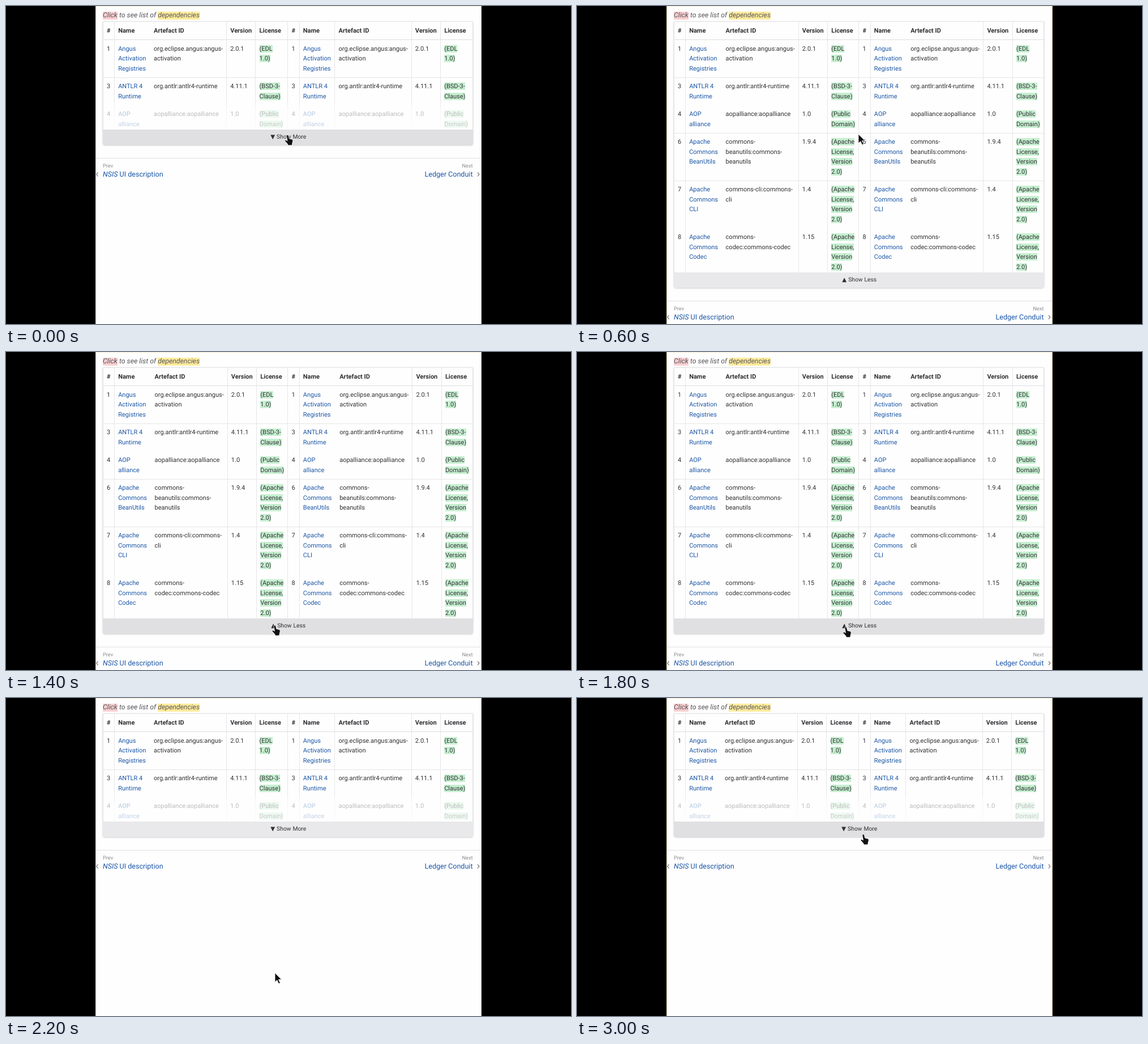
Animation, 998 px wide and 561 px high, one loop 3.2 s. Source, as an HTML page:

```html
<!DOCTYPE html>
<html lang="en">
<head>
<meta charset="utf-8">
<title>Expandable dependency table</title>
<style>
html, body { margin: 0; width: 100%; height: 100%; overflow: hidden; background: #000; }
#stage { position: relative; width: 998px; height: 561px; overflow: hidden; background: #000;
  font: 11px/17.6px Roboto, "DejaVu Sans", sans-serif; color: #303034; text-rendering: geometricPrecision; }
#stage div, #stage svg { position: absolute; box-sizing: border-box; }
.text { white-space: pre; }
.page { background: #fefefe; border: 1px solid #f6ecd2; border-width: 1px 1px 0; border-color: #f6ecd2 #ddd2b4; }
.scene { left: 0; top: 0; width: 998px; height: 561px; }
.head { font-weight: 700; }
.link { color: #1b56a6; }
.title { font-size: 12.3px; font-style: italic; color: #55555a; }
.nav { font-size: 12.55px; color: #1b56a6; }
.hint { font-size: 9.2px; color: #8b8b8f; }
mark { color: inherit; background: #c6efd0; }
.red { background: #f9cfd1; }
.yellow { background: #ffeb9c; }
.fade { background: linear-gradient(#fefefe00, #fefefea8 36%, #fefefec4); }
.frame { border: 1px solid #e2e2e4; border-radius: 0 0 4px 4px; box-shadow: 0 1px 3px #0003; }
.bar { border-radius: 0 0 4px 4px; background: #e9e9eb; font-size: 10.3px; line-height: 26px;
  text-align: center; word-spacing: .4px; padding-left: 1.4px; }
.hover .bar { background: #e0e0e2; }
.chevron { fill: none; stroke: #66666a; stroke-width: 1.2; }
#cursor { left: 0; top: 0; overflow: visible; }
</style>
</head>
<body>
<div id="stage"></div>
<script>
const stage = document.getElementById('stage');
const HALF = 326.6, LINE = 17.6, PAD = 13.65;
const apache = '(Apache|License,|Version|2.0)';
const rows = [
  [1, 'Angus|Activation|Registries', 'org.eclipse.angus:angus-|activation', '2.0.1', '(EDL|1.0)'],
  [3, 'ANTLR 4|Runtime', 'org.antlr:antlr4-runtime', '4.11.1', '(BSD-3-|Clause)'],
  [4, 'AOP|alliance', 'aopalliance:aopalliance', '1.0', '(Public|Domain)'],
  [6, 'Apache|Commons|BeanUtils', 'commons-|beanutils:commons-|beanutils', '1.9.4', apache],
  [7, 'Apache|Commons|CLI', 'commons-cli:commons-|cli', '1.4', apache],
  [8, 'Apache|Commons|Codec', 'commons-|codec:commons-codec', '1.15', apache]
];

function add(parent, cls, css, html = '') {
  const el = document.createElement('div');
  el.className = cls;
  el.style.cssText = css;
  el.innerHTML = html;
  parent.append(el);
  return el;
}
const box = (parent, cls, x, y, w, h, html) =>
  add(parent, cls, `left:${x}px;top:${y}px;width:${w}px;height:${h}px`, html);
const rule = (parent, x, y, w, h, color) => { box(parent, '', x, y, w, h).style.background = color; };

// y is the middle of the capitals in the first line
const text = (parent, cls, x, y, html) =>
  add(parent, 'text ' + cls, `left:${x}px;top:${y - 8.65}px`, html.replaceAll('|', '<br>'));
const textRight = (parent, cls, x, y, html) =>
  add(parent, 'text ' + cls, `right:${998 - x}px;top:${y - 8.65}px`, html);

function buildScene(open) {
  const scene = add(stage, 'scene', '');
  const cols = open ? [178, 198.2, 262.6, 397.8, 449.3] : [178, 198.2, 261, 396.2, 447.6];
  const end = open ? 469.5 : 217.5;
  box(scene, 'frame', 171, 27, 654, end);

  for (const dx of [0, HALF]) {
    cols.forEach((x, i) => {
      text(scene, 'head', x + dx, 43.5, ['#', 'Name', 'Artefact ID', 'Version', 'License'][i]);
      const hidden = i === 2 && (open || !dx);
      if (i && !hidden) rule(scene, Math.round(x + dx - 7.2), 28, 1, end - 28, '#e6e6e8');
    });
  }
  rule(scene, 497, 28, 1, end - 28, '#e6e6e8');
  rule(scene, 171, 58.5, 654, 1.5, '#dedee0');

  let y = 75.5;
  rows.slice(0, open ? 6 : 3).forEach((row, r) => {
    for (const dx of [0, HALF]) {
      row.forEach((value, i) => text(scene, i === 1 ? 'link' : '', cols[i] + dx, y,
        i === 4 ? `<mark>${value}</mark>` : String(value)));
    }
    if ([1, 3, 4].includes(r)) rule(scene, 171, Math.round(y - 16), 654, 1, '#e6e6e8');
    y += Math.max(...row.map(v => String(v).split('|').length)) * LINE + PAD;
  });
  if (!open) box(scene, 'fade', 172, 167, 652, 50.5);
  box(scene, 'bar', 171, end, 654, 27, open ? '▲ Show Less' : '▼ Show More');

  rule(scene, 159, end + 50.5, 680, 1, '#e0e0e2');
  text(scene, 'hint', 171, end + 65.5, 'Prev');
  text(scene, 'nav', 171, end + 79.8, '<i>NSIS</i> UI description');
  textRight(scene, 'hint', 824.5, end + 65.5, 'Next');
  textRight(scene, 'nav', 824.5, end + 79.8, 'Ledger Conduit');
  scene.insertAdjacentHTML('beforeend',
    `<svg width="998" height="561"><path class="chevron" d="M162.5 ${end + 76}l-2.7 3.5 2.7 3.5M833 ${end + 76}l2.7 3.5-2.7 3.5"/></svg>`);
  return scene;
}

box(stage, 'page', 158, 0, 682, 561);
const closed = buildScene(false), opened = buildScene(true);
text(stage, 'title', 171, 18, '<mark class="red">Click</mark> to see list of <mark class="yellow">dependencies</mark>');
stage.insertAdjacentHTML('beforeend',
  '<svg id="cursor" width="1" height="1"><path fill="#111" stroke="#fff" stroke-width=".8" stroke-linejoin="round"/></svg>');

const pointer = document.querySelector('#cursor path');
const ARROW = 'M0 0V16.2L3.8 12.7 6.6 19 9.3 17.8 6.6 11.7H11.6Z';
const HAND = 'M-1.6 1.2Q-1-.5.8 0L2 1.3 3.2 6.4 8.4 7.8Q10 8.4 9.7 11L8.6 15.4 8.2 18.3H1L.4 16-4.4 10.6Q-4.4 8.4-2.4 8.9L0 10.4Z';

// time, x, y, hand over the bar
const steps = [
  [0, 497, 227.5, 1], [600, 497, 226, 0], [1000, 482, 417, 0], [1200, 479, 462, 0],
  [1400, 474.5, 482, 1], [1600, 474.5, 485, 1], [2200, 475, 485, 0], [2400, 481, 451, 0],
  [2600, 518, 278, 0], [2800, 507, 244, 0], [3000, 505.5, 240.5, 1]
];

function draw() {
  const t = performance.now() % 3200;
  const [, x, y, hand] = steps.findLast(step => step[0] <= t);
  const open = t >= 600 && t < 2200;
  opened.style.display = open ? '' : 'none';
  closed.style.display = open ? 'none' : '';
  stage.classList.toggle('hover', !!hand);
  pointer.setAttribute('d', hand ? HAND : ARROW);
  pointer.setAttribute('transform', `translate(${x} ${y})`);
  requestAnimationFrame(draw);
}
draw();
</script>
</body>
</html>
```
